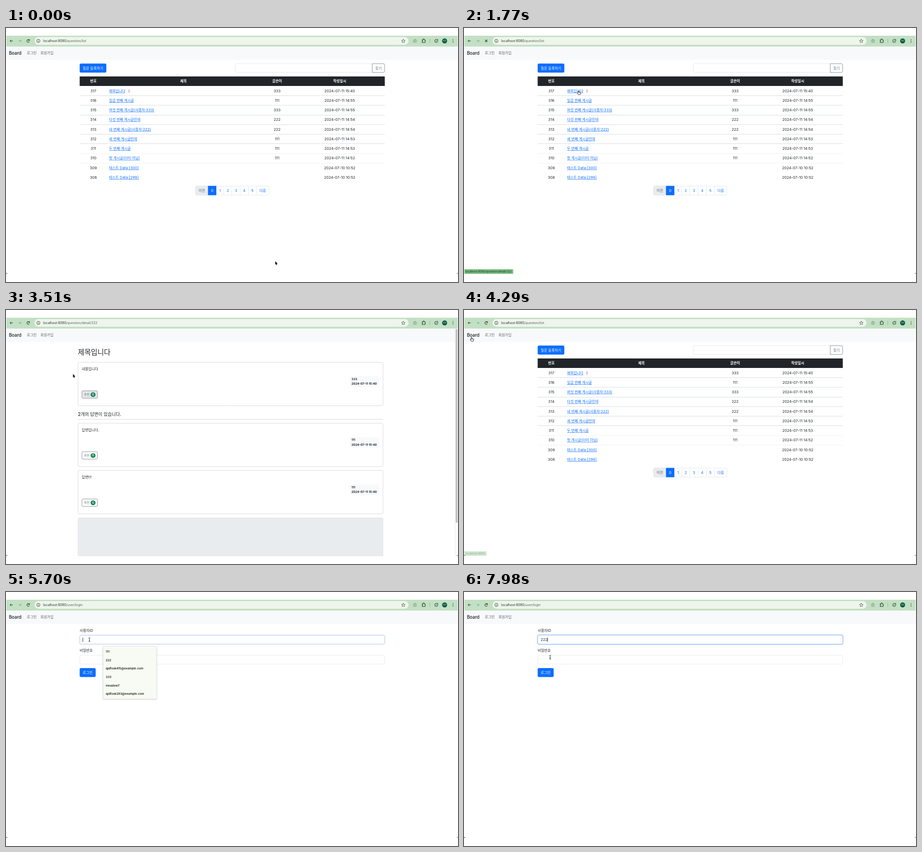
Recreate the animation shown at these times as an HTML page with a canvas. Size 997 by 561 pixels, loop 8 s.

```html
<!DOCTYPE html>
<html lang="ko">
<head>
<meta charset="utf-8">
<title>Board</title>
<style>
html, body { margin: 0; width: 100%; height: 100%; overflow: hidden; background: #fff; }
canvas { display: block; }
</style>
</head>
<body>
<canvas id="stage" width="997" height="561"></canvas>
<script>
const c = document.getElementById('stage').getContext('2d');
const LOOP = 8000;
const BLUE = '#0d6efd', INK = '#212529', GREY = '#6c757d', LINE = '#dee2e6';
const FONT = 'Inter, "Noto Sans CJK KR", "Noto Sans CJK JP", sans-serif';
const HANGUL = '"Noto Sans CJK KR", "Noto Sans CJK JP", sans-serif';

const ramp = (t, a, b) => Math.min(1, Math.max(0, (t - a) / (b - a)));
const within = (v, a, b) => v >= a && v < b;

// Hangul runs are set a little smaller than Latin ones
function text(s, x, y, size = 8.2, color = INK, align = 'left', weight = 400) {
  const runs = s.match(/[가-힣]+|[^가-힣]+/g).map(r => {
    const ko = /[가-힣]/.test(r);
    const font = ko ? `${weight} ${size * 0.95}px ${HANGUL}` : `${weight} ${size}px ${FONT}`;
    c.font = font;
    return { r, font, w: c.measureText(r).width };
  });
  const width = runs.reduce((n, r) => n + r.w, 0);
  if (align === 'center') x -= width / 2;
  c.fillStyle = color;
  for (const r of runs) {
    c.font = r.font;
    c.fillText(r.r, x, y + size * 0.36);
    x += r.w;
  }
  return width;
}

function box(x0, y0, x1, y1, fill, stroke, r = 3, lw = 0.8) {
  c.beginPath();
  c.roundRect(x0, y0, x1 - x0, y1 - y0, r);
  if (fill) { c.fillStyle = fill; c.fill(); }
  if (stroke) { c.strokeStyle = stroke; c.lineWidth = lw; c.stroke(); }
}

function rect(x, y, w, h, fill) {
  c.fillStyle = fill;
  c.fillRect(x, y, w, h);
}

function lines(d, color = '#333', lw = 1) {
  c.strokeStyle = color;
  c.lineWidth = lw;
  c.stroke(new Path2D(d));
}

function disc(x, y, r, color) {
  c.fillStyle = color;
  c.beginPath();
  c.arc(x, y, r, 0, 7);
  c.fill();
}

const urls = {
  list: '/question/list',
  detail: '/question/detail/322',
  login: '/user/login'
};

function pageAt(t) {
  if (within(t, 1860, 4190)) return 'detail';
  return t < 5260 ? 'list' : 'login';
}

function browser(t, page) {
  rect(1, 17, 995, 24, '#c3e0c4');
  box(63, 20, 888, 37, '#edf5ec', null, 8.5);
  lines('M15 28.5H9M11.7 25.7L8.9 28.5L11.7 31.3', '#2b382d');
  lines('M27.5 28.5H33.5M30.8 25.7L33.6 28.5L30.8 31.3', '#8aa28c');
  if (within(t, 1700, 1860) || within(t, 4120, 4190) || within(t, 5180, 5260)) {
    lines('M46.5 26L51.5 31M51.5 26L46.5 31', '#2b382d', 1.1);
  } else {
    lines('M51.5 30A2.9 2.9 0 1 1 51.2 26.6M51.8 25V27.5H49.3', '#2b382d', 1.1);
  }
  lines('M75 28.5A3.6 3.6 0 1 1 67.8 28.5A3.6 3.6 0 1 1 75 28.5M71.4 28V30.6M71.4 26.3V27.2', '#303a31', 0.9);
  const w = text('localhost:8080', 82, 28.5, 7.2, '#263028');
  text(urls[page], 82 + w, 28.5, 7.2, '#58645a');

  c.beginPath();
  for (let i = 0; i < 10; i++) {
    const a = -Math.PI / 2 + i * Math.PI / 5, r = i % 2 ? 1.9 : 4.3;
    c.lineTo(876.3 + r * Math.cos(a), 28.8 + r * Math.sin(a));
  }
  c.closePath();
  c.strokeStyle = '#3b473d';
  c.lineWidth = 0.8;
  c.stroke();
  box(898.5, 26.2, 905.5, 31.8, null, '#7d947f', 1);
  lines('M900.5 26L901 25H903L903.5 26M903.5 29A1.5 1.5 0 1 1 900.5 29A1.5 1.5 0 1 1 903.5 29', '#7d947f', 0.8);
  lines('M918 26H920V25.3A1.2 1.2 0 0 1 922.4 25.3V26H924.3V28A1.1 1.1 0 0 1 924.3 30.2V32H918V30.3A1.2 1.2 0 0 0 918 27.9Z', '#27352a', 1.1);
  rect(934.4, 24, 0.9, 9, '#8fb492');
  lines('M952.3 25.2V28.5A3.4 3.4 0 1 1 949 25.2Z M947.8 29.8L950.5 27', '#27352a', 1);
  disc(967.5, 28.5, 5.5, '#0a5847');
  text('계정', 967.5, 28.5, 4.2, '#b9d8cc', 'center');
  for (const y of [25.6, 28.5, 31.4]) disc(986, y, 0.8, '#27352a');

  rect(1, 41, 995, 29.5, '#f8f9fa');
  text('Board', 6.4, 55.6, 9.8, '#16191c', 'left', 500);
  text('로그인', 46, 55.5, 8.2, '#595c5f');
  text('회원가입', 76, 55.5, 8.2, '#595c5f');
}

const posts = [
  ['제목입니다', '333', '11 15:40'],
  ['일곱 번째 게시글', '111', '11 14:55'],
  ['여섯 번째 게시글(사용자:333)', '333', '11 14:55'],
  ['다섯 번째 게시글인데', '222', '11 14:54'],
  ['네 번째 게시글(사용자:222)', '222', '11 14:54'],
  ['세 번째 게시글인데', '111', '11 14:53'],
  ['두 번째 게시글', '111', '11 14:53'],
  ['첫 게시글(더미 아님)', '111', '11 14:52'],
  ['테스트 Data:[300]', '', '10 10:52'],
  ['테스트 Data:[299]', '', '10 10:52']
];

function list() {
  box(162.5, 78.5, 221.3, 98.5, BLUE);
  text('질문 등록하기', 191.8, 88.6, 8.2, '#fff', 'center', 500);
  box(505.5, 78.8, 808, 98.2, '#fff', LINE, [3, 0, 0, 3]);
  box(808, 78.8, 835.2, 98.2, '#fff', GREY, [0, 3, 3, 0]);
  text('찾기', 821.6, 88.6, 8.2, GREY, 'center');

  rect(162.5, 107, 673, 21, INK);
  [['번호', 192.7], ['제목', 391.5], ['글쓴이', 598], ['작성일시', 736]]
    .forEach(([s, x]) => text(s, x, 117.5, 8.2, '#fff', 'center', 700));

  posts.forEach(([title, who, date], i) => {
    const y = 138.7 + 21.25 * i;
    text(String(317 - i), 192.7, y, 8.2, INK, 'center');
    const w = text(title, 227.3, y, 8.2, BLUE);
    rect(227.3, y + 4.1, w, 0.7, BLUE);
    if (who) text(who, 598, y, 8.2, INK, 'center');
    text('2024-07-' + date, 736, y, 8.2, INK, 'center');
    if (i < 8) rect(162.5, Math.round(y + 10.3), 673, 1, i < 6 ? '#d9dcdf' : '#eff1f2');
  });
  text('2', 269, 139.3, 7.2, '#dc3545');

  const edges = [418.3, 445.5, 464, 480.5, 498, 516.5, 534.5, 552.5, 580];
  box(418.3, 349, 580, 369, '#fff', LINE);
  box(418.3, 349, 445.5, 369, '#e9ecef', LINE, [3, 0, 0, 3]);
  rect(445.5, 348.7, 18.5, 20.6, BLUE);
  ['이전', '0', '1', '2', '3', '4', '5', '다음'].forEach((s, i) => {
    const color = i === 0 ? '#5c636a' : i === 1 ? '#fff' : BLUE;
    text(s, (edges[i] + edges[i + 1]) / 2, 359.2, 8.2, color, 'center');
    if (i > 2) rect(edges[i] - 0.4, 349, 0.8, 20, LINE);
  });
}

function card(y, body, who, hover) {
  box(158.8, y, 831.6, y + 96, '#fff', '#cfd1d4');
  text(body, 167.3, y + 15, 8.2);
  box(758, y + 30.5, 823.3, y + 54.3, '#f8f9fa');
  text(who, 762, y + 37, 6.5, INK, 'left', 700);
  text('2024-07-11 15:40', 762, y + 47.2, 6.5, INK, 'left', 700);
  box(167.5, y + 63, 201.8, y + 79.3, '#fff', GREY, 2.3);
  if (hover) {
    c.globalAlpha = hover;
    box(167.5, y + 63, 201.8, y + 79.3, GREY, null, 2.3);
    c.globalAlpha = 1;
  }
  text('추천', 172, y + 71.4, 7, hover > 0.5 ? '#fff' : GREY);
  box(186.5, y + 66.2, 197.5, y + 76.6, '#198754', null, 5.2);
  text('0', 192, y + 71.4, 5.8, '#fff', 'center', 700);
}

function detail(t) {
  text('제목입니다', 158.5, 92.8, 16.5, INK, 'left', 500);
  card(115.5, '내용입니다', '333', ramp(t, 3360, 3440) * (1 - ramp(t, 3420, 3530)));
  text('2개의 답변이 있습니다.', 158.5, 230.7, 10.3, INK, 'left', 500);
  rect(158.5, 241, 673.5, 1, '#d5d8db');
  card(250, '답변입니다.', '111', 0);
  card(354.4, '답변!!!', '111', 0);
  box(158.8, 459, 831.6, 543, '#e9ecef', LINE, [3, 3, 0, 0]);
  rect(990, 41, 6, 502, '#fcfcfc');
  rect(990, 41, 0.7, 502, '#e4e4e4');
  box(991.8, 42, 996, 470, '#c1c1c1', null, 1);
}

const hints = ['111', '222', 'qjdfosk415@example.com', '333', 'meadow7', 'qjdfosk283@example.com'];

function dropdown(items) {
  const h = 4 + items.length * 18.7;
  c.save();
  c.shadowColor = 'rgba(0,0,0,.28)';
  c.shadowBlur = 3;
  c.shadowOffsetY = 0.8;
  box(214, 120, 332.3, 120 + h, '#f8fbf3');
  c.restore();
  box(214, 120, 332.3, 120 + h, '#f8fbf3', '#d9ddd5', 3, 0.6);
  c.fillStyle = '#f3f6ee';
  c.fill(new Path2D('M219.5 120L223.5 116.3L227.5 120Z'));
  items.forEach((s, i) => text(s, 220, 131.6 + 18.7 * i, 6.5, '#1c211c', 'left', 600));
}

function login(t) {
  text('사용자ID', 162.5, 85.3, 8.2);
  const ring = ramp(t, 5670, 5830);
  if (ring) {
    c.globalAlpha = ring;
    box(162.8, 95.5, 835.2, 115, null, '#c2dafe', 3, 4);
    c.globalAlpha = 1;
  }
  box(162.8, 95.5, 835.2, 115, '#fff', t < 5650 ? LINE : '#9dbdf0');
  text('비밀번호', 162.5, 129.4, 8.2);
  box(162.8, 139.7, 835.2, 159.2, '#fff', LINE);
  box(162.5, 168, 197.8, 187.7, BLUE);
  text('로그인', 180.1, 178, 8.2, '#fff', 'center');

  const keys = [6540, 6720, 6900];
  const typed = keys.filter(k => t >= k).length;
  const w = typed ? text('2'.repeat(typed), 169.2, 105.4, 8.2) : 0;
  const since = t - (typed ? keys[typed - 1] : 5590);
  if (t >= 5640 && since % 1000 < 500) rect(169 + w, 100.8, 0.9, 9.4, '#111');
  if (within(t, 5660, 6540)) dropdown(hints);
  else if (within(t, 6540, 6960)) dropdown(['222']);
}

function status(t) {
  let s, a;
  if (within(t, 1300, 2230)) {
    s = urls.detail;
    a = ramp(t, 1300, 1450) * (1 - ramp(t, 2060, 2215));
  } else if (within(t, 4230, 5400)) {
    s = t < 4770 ? '' : urls.login;
    a = ramp(t, 4230, 4410) * (1 - ramp(t, 5230, 5390));
  } else return;
  s = 'localhost:8080' + s;
  c.font = `6.15px ${FONT}`;
  c.globalAlpha = a;
  box(1, 532.7, c.measureText(s).width + 6.5, 543, '#79bd7d', null, [0, 2, 0, 0]);
  text(s, 3, 538, 6.15, '#203323');
  c.globalAlpha = 1;
}

// time, x, y of the pointer tip
const path = [
  [0, 594, 515], [480, 594, 515], [800, 470, 390], [1000, 330, 220],
  [1240, 252.5, 138], [1980, 252.5, 138], [2190, 258, 211], [3120, 258, 211],
  [3400, 190, 184], [3510, 148, 141.5], [3660, 120, 118], [3900, 38, 72],
  [4020, 16.5, 60], [4560, 16.5, 60], [4740, 57, 56], [5330, 57, 56],
  [5600, 184, 105.5], [7350, 184, 105.5], [7560, 146, 170], [7680, 149, 168],
  [7940, 190, 144], [8001, 190, 144]
];

function slope(i, k) {
  const a = path[i - 1], p = path[i], b = path[i + 1];
  const rest = q => !q || (q[1] === p[1] && q[2] === p[2]);
  return rest(a) || rest(b) ? 0 : (b[k] - a[k]) / (b[0] - a[0]);
}

function pointer(t) {
  const i = path.findIndex(p => p[0] > t) - 1;
  const a = path[i], b = path[i + 1], d = b[0] - a[0], u = (t - a[0]) / d;
  return [1, 2].map(k => {
    const e = u * u * (3 - 2 * u);
    return a[k] + (b[k] - a[k]) * e
      + d * u * (1 - u) * ((1 - u) * slope(i, k) - u * slope(i + 1, k));
  });
}

function shape(page, x, y) {
  const over = (x0, y0, x1, y1) => within(x, x0, x1) && within(y, y0, y1);
  if (over(6, 47, 34, 65) || over(46, 48, 68, 63) || over(76, 48, 105, 63)) return 'hand';
  if (page === 'list' && over(227, 133, 264, 144)) return 'hand';
  if (page === 'detail' && over(167, 178, 202, 195)) return 'hand';
  if (page === 'login') {
    if (over(162, 168, 198, 188)) return 'hand';
    if (over(162, 95, 835, 115) || over(162, 139, 835, 160)) return 'beam';
  }
  return 'arrow';
}

const arrow = new Path2D('M0 0V7.7L1.7 6.2L2.9 9L4.2 8.4L3 5.7H5.2Z');
const hand = new Path2D('M-.9 .8Q0 -.5 .9 .8V3.2Q2 2.6 2.4 3.5Q3.4 3 3.7 4Q4.7 3.7 4.7 4.9V6.5L3.9 9H-.5L-2.8 5.7Q-3 4.4 -1.8 4.8L-.9 5.6Z');
const beam = 'M-1.8 -4.3Q0 -4.3 0 -3.2V3.4Q0 4.4 -1.8 4.4M1.8 -4.3Q0 -4.3 0 -3.2M0 3.4Q0 4.4 1.8 4.4M-1 1.2H1';

function cursor(t, page) {
  if (within(t, 6360, 7350)) return;
  const [x, y] = pointer(t), kind = shape(page, x, y);
  c.save();
  c.translate(x, y);
  c.lineJoin = 'round';
  if (kind === 'beam') {
    lines(beam, '#fff', 1.8);
    lines(beam, '#111', 0.9);
  } else if (kind === 'hand') {
    c.fillStyle = '#fff';
    c.fill(hand);
    c.strokeStyle = '#111';
    c.lineWidth = 0.9;
    c.stroke(hand);
    lines('M.9 3.2V5M2.4 3.5V5.2M3.7 4V5.4', '#111', 0.6);
  } else {
    c.strokeStyle = '#fff';
    c.lineWidth = 1.5;
    c.stroke(arrow);
    c.fillStyle = '#111';
    c.fill(arrow);
  }
  c.restore();
}

function draw(now) {
  const t = now % LOOP, page = pageAt(t);
  rect(0, 0, 997, 561, '#fff');
  browser(t, page);
  ({ list, detail, login })[page](t);
  c.fillStyle = '#222';
  c.fill(new Path2D('M1 540.5L3 543H1ZM996 540.5L994.5 543H996Z'));
  status(t);
  cursor(t, page);
  requestAnimationFrame(draw);
}
requestAnimationFrame(draw);
</script>
</body>
</html>
```
